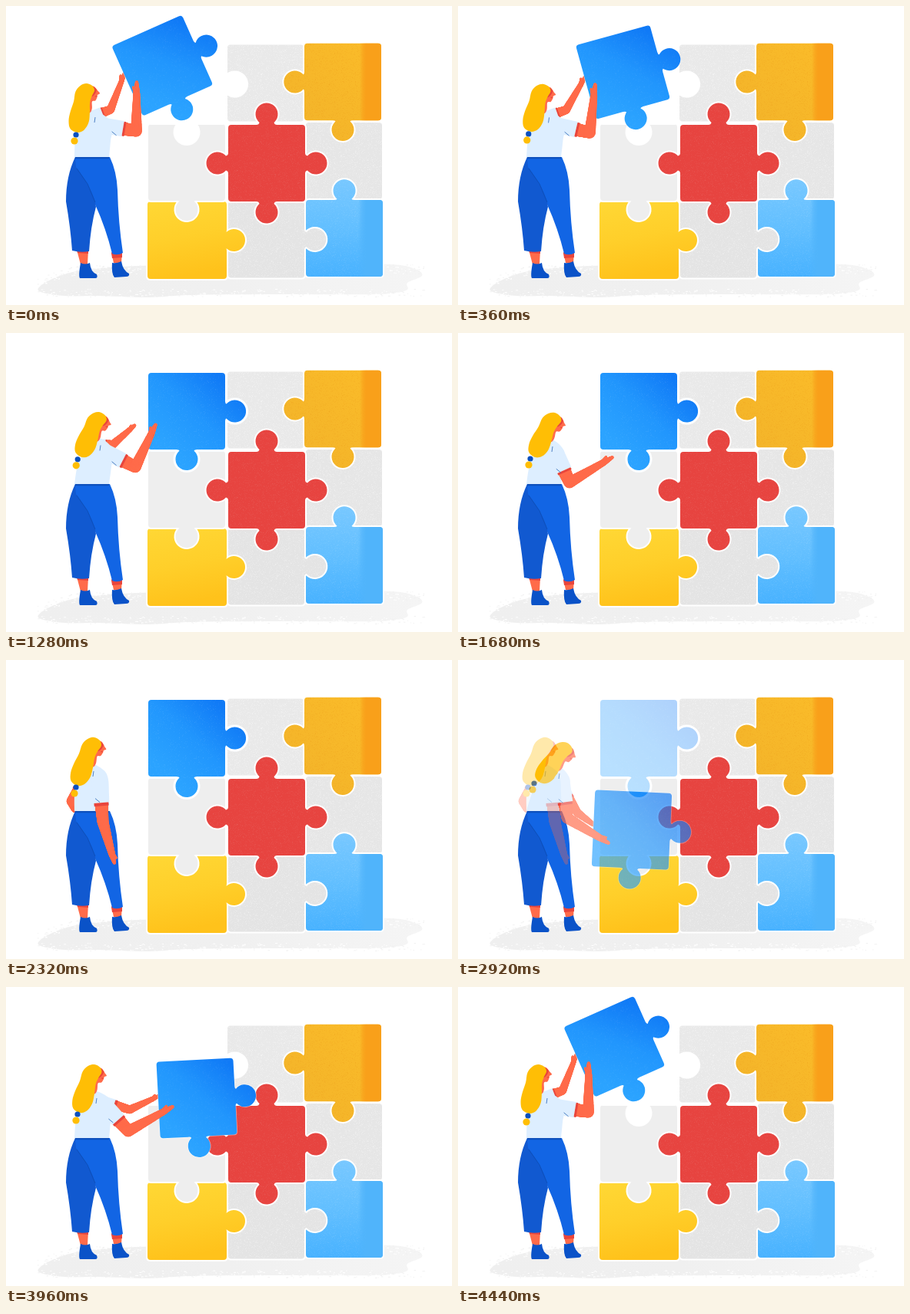
An HTML page with a canvas that plays this animation: 580x390 px, repeating every 4480 ms.

```html
<!DOCTYPE html>
<html lang="en">
<head>
<meta charset="utf-8">
<title>Puzzle</title>
<style>
html, body { margin: 0; width: 100%; height: 100%; overflow: hidden; background: #fff; }
canvas { display: block; width: 580px; height: 390px; }
</style>
</head>
<body>
<canvas id="stage" width="580" height="390"></canvas>
<script>
const W = 580, H = 390, LOOP = 4480, STEP = 40;
const SKIN = '#ff6b4a', SHADE = '#e8453c', SHIRT = '#ddeeff', HAIR = '#ffbe05', NAVY = '#0b50bf';
const stage = document.getElementById('stage').getContext('2d');

function newLayer() {
  const canvas = document.createElement('canvas');
  canvas.width = W;
  canvas.height = H;
  return canvas.getContext('2d');
}

function seeded(seed) {
  return () => (seed = (seed * 16807) % 2147483647) / 2147483647;
}

// Catmull-Rom curve through the points; an open curve closes with a straight line.
function smooth(pts, closed = true) {
  const n = pts.length, path = new Path2D();
  const at = i => closed ? pts[(i + n) % n] : pts[Math.max(0, Math.min(n - 1, i))];
  path.moveTo(...pts[0]);
  for (let i = 0; i < (closed ? n : n - 1); i++) {
    const [a, b, c, d] = [at(i - 1), at(i), at(i + 1), at(i + 2)];
    path.bezierCurveTo(b[0] + (c[0] - a[0]) / 6, b[1] + (c[1] - a[1]) / 6,
      c[0] - (d[0] - b[0]) / 6, c[1] - (d[1] - b[1]) / 6, c[0], c[1]);
  }
  path.closePath();
  return path;
}

function fill(g, color, path) {
  g.fillStyle = color;
  g.fill(path);
}

function line(g, color, width, ...pts) {
  g.strokeStyle = color;
  g.lineWidth = width;
  g.beginPath();
  pts.forEach(p => g.lineTo(...p));
  g.stroke();
}

function dot(g, x, y, r) {
  g.beginPath();
  g.arc(x, y, r, 0, Math.PI * 2);
  g.fill();
}

// ---------- puzzle ----------
function piecePath(cx, cy, w, h, tabs, reach = 12.2) {
  const path = new Path2D(), r = 14.5, neck = 9.5, corner = 4;
  const dip = Math.sqrt(r * r - neck * neck), open = Math.atan2(dip, neck);
  for (let k = 0; k < 4; k++) {
    const along = k % 2 ? h : w, out = k % 2 ? w : h;
    const at = (u, v) => {
      let x = u, y = -v;
      for (let i = 0; i < k; i++) [x, y] = [-y, x];
      return [cx + x, cy + y];
    };
    if (!k) path.moveTo(...at(corner - along, out));
    if (tabs.includes('trbl'[k])) {
      const turn = k * Math.PI / 2;
      path.lineTo(...at(-13.5, out));
      path.quadraticCurveTo(...at(-10, out), ...at(-neck, out + reach - dip));
      path.arc(...at(0, out + reach), r, Math.PI - open + turn, open + turn + Math.PI * 2);
      path.quadraticCurveTo(...at(10, out), ...at(13.5, out));
    }
    path.lineTo(...at(along - corner, out));
    path.quadraticCurveTo(...at(along, out), ...at(along, out - corner));
  }
  return path;
}

function gradient(g, x0, y0, x1, y1, ...colors) {
  const grad = g.createLinearGradient(x0, y0, x1, y1);
  colors.forEach((c, i) => grad.addColorStop(i / (colors.length - 1), c));
  return grad;
}

function grain(g, path, cx, cy, count, color, seed) {
  const rnd = seeded(seed);
  g.save();
  g.clip(path);
  g.fillStyle = color;
  for (let i = 0; i < count; i++) {
    g.fillRect(cx - 82 + Math.floor(rnd() * 164), cy - 82 + Math.floor(rnd() * 164), 1, 1);
  }
  g.restore();
}

function addPiece(g, [cx, cy, w, h], tabs, paint, speck, edge = 4, reach) {
  const path = piecePath(cx, cy, w, h, tabs, reach);
  g.strokeStyle = '#fff';
  g.lineWidth = edge;
  g.stroke(path);
  fill(g, paint, path);
  if (speck) grain(g, path, Math.round(cx), Math.round(cy), 5000, speck, Math.round(cx * 31 + cy));
  return path;
}

function band(g, path, x, width, color) {
  g.save();
  g.clip(path);
  g.fillStyle = gradient(g, x, 0, x + width, 0, color + '00', color + 'aa', color);
  g.fillRect(x, 0, 90, H);
  g.restore();
}

function drawGround(g) {
  const pts = [[42, 371], [58, 357], [92, 346], [150, 340], [260, 337], [400, 336],
    [500, 337], [532, 343], [541, 352], [522, 361], [520, 371], [480, 376], [350, 376],
    [240, 377], [185, 380], [120, 378], [75, 378]];
  fill(g, gradient(g, 40, 0, 540, 0, '#efefef', '#f0f0f0', '#f5f5f5'), smooth(pts));
  const rnd = seeded(77);
  for (let i = 0; i < 900; i++) {
    const x = 38 + rnd() * 505, side = rnd() < .6;
    const y = side ? 337 + Math.max(0, 95 - x) * .3 + rnd() * 12 : 369 + rnd() * 10;
    g.fillStyle = rnd() < .5 ? '#fff' : '#f2f2f2';
    g.fillRect(x, y, 1 + rnd() * 2, 1);
  }
}

const board = newLayer();
function drawBoard(g) {
  drawGround(g);
  addPiece(g, [439.5, 202, 49.5, 50], '', '#e6e6e6', 'rgba(255,255,255,.2)');
  const sky = addPiece(g, [440, 303, 50, 50], 't',
    gradient(g, 0, 226, 0, 353, '#78c8ff', '#62bfff', '#48b2ff'), 'rgba(255,255,255,.05)');
  band(g, sky, 458, 10, '#50b4fb');
  addPiece(g, [338.5, 304.5, 49.5, 50], 'r', '#e4e4e4', 'rgba(255,255,255,.2)', 4, 13.8);
  addPiece(g, [235.5, 305.5, 51.5, 50.5], 'r',
    gradient(g, 200, 255, 220, 355, '#ffd734', '#ffcf2a', '#ffc21b'), null, 4, 9.5);
  addPiece(g, [235, 204, 50, 50], 'b', '#eee', null, 4, 11.5);
  addPiece(g, [337.5, 100.5, 49.5, 50], '', '#e9e9e9', 'rgba(255,255,255,.22)');
  addPiece(g, [339, 205, 50, 50], 'trbl', '#e74440', 'rgba(255,255,255,.04)', 4, 14);
  const amber = addPiece(g, [438, 99, 50, 50.3], 'lb',
    gradient(g, 375, 150, 470, 60, '#f3b42a', '#fabb29'), 'rgba(225,135,20,.09)');
  band(g, amber, 460, 8, '#f9a01a');
  addPiece(g, [235, 102, 50, 50], 'rb', '#fff', null, 6, 12.6);
}
drawBoard(board);

const bluePath = piecePath(0, 0, 50, 50, 'rb', 12.6);
function drawBlue(g, [x, y, degrees]) {
  g.save();
  g.translate(x, y);
  g.rotate(degrees * Math.PI / 180);
  g.strokeStyle = 'rgba(255,255,255,.45)';
  g.lineWidth = 1.6;
  g.stroke(bluePath);
  fill(g, gradient(g, -32, 40, 46, -42, '#2ba3ff', '#2196fd', '#107af6'), bluePath);
  grain(g, bluePath, 0, 0, 1800, 'rgba(255,255,255,.05)', 905);
  g.restore();
}

// ---------- woman ----------
function drawLegs(g) {
  fill(g, SKIN, new Path2D('M92 318H107L106 337H97Z M137 321H151L150 335H140Z'));
  fill(g, SHADE, new Path2D('M92 318H107V323L93 322Z M137 322H151V328L138 329Z'));
  fill(g, '#0a52c8', new Path2D(
    'M97 335Q103 338 109 335Q110 347 118 350Q120 355 116 355H96Q94 352 97 335Z' +
    'M138 335Q144 336 150 333Q152 345 160 349Q161 353 156 353L141 354Q137 350 138 335Z'));
  fill(g, '#1265e4', new Path2D(
    'M90 197H135Q144 216 145 240Q146 282 152 322Q145 326 138 323Q130 290 116 259L85 225Z'));
  fill(g, '#1159d0', new Path2D(
    'M90 197Q78 222 78 255Q84 290 86 319Q97 322 108 320Q110 288 117 262Q114 240 91 210Z'));
  line(g, '#0d4fb9', 1, [92, 212], [106, 232], [116, 256]);
  line(g, '#0d50bd', 2.5, [90, 198], [134, 198]);
}

const between = (a, b, p) => [a[0] + (b[0] - a[0]) * p, a[1] + (b[1] - a[1]) * p];

// A run of discs whose radius tapers from one joint to the next.
function limb(g, joints, radii) {
  g.fillStyle = SKIN;
  for (let i = 1; i < joints.length; i++) {
    for (let p = 0; p <= 1; p += 1 / 48) {
      dot(g, ...between(joints[i - 1], joints[i], p), radii[i - 1] + (radii[i - 1 + 1] - radii[i - 1]) * p);
    }
  }
}

function arm(g, shoulder, elbow, hand, size) {
  const wrist = between(elbow, hand, .74), hem = between(shoulder, elbow, .58);
  const dx = hand[0] - wrist[0], dy = hand[1] - wrist[1];
  limb(g, [hem, elbow, wrist, hand], [8.6 * size, 7.4 * size, 4.5 * size, 2]);
  const thumb = [wrist[0] + dx * .6 + dy * .28, wrist[1] + dy * .6 - dx * .28];
  limb(g, [wrist, thumb], [3 * size, 1.4]);
  line(g, SHADE, 19 * size, hem, between(shoulder, elbow, .65));
  line(g, SHIRT, 20.5 * size, shoulder, hem);
  g.fillStyle = SHIRT;
  dot(g, ...shoulder, 10.2 * size);
}

function drawTorso(g, { neck: [x, y], front }) {
  const pts = [[89, 197], [(89 + x - 14) / 2 - 4, 168], [x - 13, y + 8], [x, y - 1], front,
    [Math.max(134, front[0] - 2), 176], [134, 197]];
  fill(g, SHIRT, smooth(pts, false));
}

const facePath = smooth([[0, 6], [9, 2], [14, 4.6], [16.5, 7], [19.6, 9.6], [17, 12],
  [17, 15], [15.5, 20], [11.5, 22], [13, 31], [11, 37], [2, 37]]);

function drawHead(g, { crown, tail, tip }) {
  const dx = crown[0] - tail[0], dy = tail[1] - crown[1];
  const s = Math.hypot(dx, dy) / 65;
  const hair = [[0, 0], [8, 1.5], [12, 7], [10, 15], [9, 24], [11, 36], [12, 49], [8, 60], [0, 65],
    [-10, 62], [-14, 52], [-14, 40], [-12, 26], [-12, 13], [-7, 4]];
  g.save();
  g.translate(...crown);
  g.rotate(Math.atan2(dx, dy));
  fill(g, SKIN, facePath);
  fill(g, SHADE, smooth([[8, 3], [14, 5], [14, 10], [11, 15], [8, 14]]));
  line(g, SHADE, 1.2, [14, 14.5], [16.5, 14.2]);
  fill(g, HAIR, smooth(hair.map(([x, y]) => [x, y * s])));
  g.restore();
  g.fillStyle = NAVY;
  dot(g, tip[0] + 2, tip[1] - 8, 3.6);
  g.fillStyle = HAIR;
  dot(g, ...tip, 4.6);
}

function drawScene(g, pose) {
  const { neck, front } = pose;
  const shoulder = [front[0] - 10, front[1] + 3];
  g.fillStyle = '#fff';
  g.fillRect(0, 0, W, H);
  g.drawImage(board.canvas, 0, 0);
  arm(g, [neck[0] - 5, neck[1] + 8], pose.farElbow, pose.farHand, .72);
  drawBlue(g, pose.piece);
  drawLegs(g);
  drawTorso(g, pose);
  drawHead(g, pose);
  arm(g, shoulder, pose.elbow, pose.hand, 1);
  line(g, '#3f74bd', .9, [neck[0] + 1, neck[1] + 8], [neck[0], neck[1] + 15]);
  const fold = between(shoulder, pose.elbow, .4);
  line(g, '#3f74bd', .9, [fold[0] - 7, fold[1] + 5], [fold[0] - 1, fold[1] + 10]);
}

// ---------- motion ----------
const reach = {
  crown: [104.5, 101], tail: [93, 165], tip: [89, 176], neck: [115, 137], front: [138, 153],
  elbow: [169.5, 163], hand: [170, 99], farElbow: [136, 135], farHand: [154.5, 87], piece: [203.3, 77.6, -24]
};
const push = {
  crown: [121, 103], tail: [98, 162], tip: [91, 173], neck: [122, 138], front: [139, 151],
  elbow: [175, 169], hand: [193, 107], farElbow: [149, 136], farHand: [185, 101], piece: [234, 101.4, -.5]
};
const offer = {
  crown: [126, 104], tail: [100, 162], tip: [92, 172], neck: [122, 140], front: [138, 154],
  elbow: [145, 195], hand: [201, 162], farElbow: [104, 178], farHand: [106, 188], piece: [235, 102, 0]
};
const rest = {
  crown: [115, 101], tail: [93, 164], tip: [89, 174], neck: [113, 137], front: [131, 149],
  elbow: [126, 211], hand: [141, 265], farElbow: [84, 184], farHand: [89, 197], piece: [235, 102, 0]
};
const hold = {
  crown: [142, 108], tail: [107, 160], tip: [97, 169], neck: [131, 140], front: [145, 154],
  elbow: [142, 206], hand: [199, 238], farElbow: [155, 199], farHand: [181, 215], piece: [229, 220.5, 2]
};
const lift = {
  crown: [115, 101], tail: [96, 164], tip: [91, 174], neck: [117, 137], front: [138, 150],
  elbow: [159, 188], hand: [217, 156], farElbow: [161, 160], farHand: [199, 142], piece: [248, 145, -3]
};
const placed = { ...push, piece: rest.piece };
const crouch = { ...hold, hand: [196, 239], farHand: [178, 216], piece: [226, 221.5, 2.6] };

const inOut = n => p => p < .5 ? 2 ** (n - 1) * p ** n : 1 - 2 ** (n - 1) * (1 - p) ** n;
const easeIn = n => p => p ** n;
const easeOut = n => p => 1 - (1 - p) ** n;

// start, end, from, to, easing across, easing down
const moves = [
  [0, 800, reach, push, inOut(3)],
  [800, 1000, push, placed, easeOut(2)],
  [1080, 1680, placed, offer, inOut(2)],
  [1680, 2320, offer, rest, inOut(2)],
  [3200, 3400, crouch, hold, inOut(2)],
  [3400, 3960, hold, lift, easeIn(1.8), easeIn(4.5)],
  [3960, 4440, lift, reach, inOut(2), easeOut(3)]
];

function poseAt(t) {
  if (t >= 2880 && t < 3200) return crouch;
  const [start, end, from, to, across, down = across] = moves.filter(m => m[0] <= t).pop();
  const p = Math.min(1, (t - start) / (end - start)), ease = [across(p), down(p), down(p)];
  return Object.fromEntries(Object.entries(from).map(([part, values]) =>
    [part, values.map((v, i) => v + (to[part][i] - v) * ease[i])]));
}

const overlay = newLayer();
function render(t) {
  const fade = (t - 2840) / 120;
  if (fade > 0 && fade < 1) {
    drawScene(stage, rest);
    drawScene(overlay, crouch);
    stage.globalAlpha = fade;
    stage.drawImage(overlay.canvas, 0, 0);
    stage.globalAlpha = 1;
  } else {
    drawScene(stage, poseAt(t));
  }
}

const began = performance.now();
let shown = -1;
function tick() {
  const t = Math.floor(((performance.now() - began) % LOOP) / STEP) * STEP;
  if (t !== shown) render(shown = t);
  requestAnimationFrame(tick);
}
tick();
</script>
</body>
</html>
```
